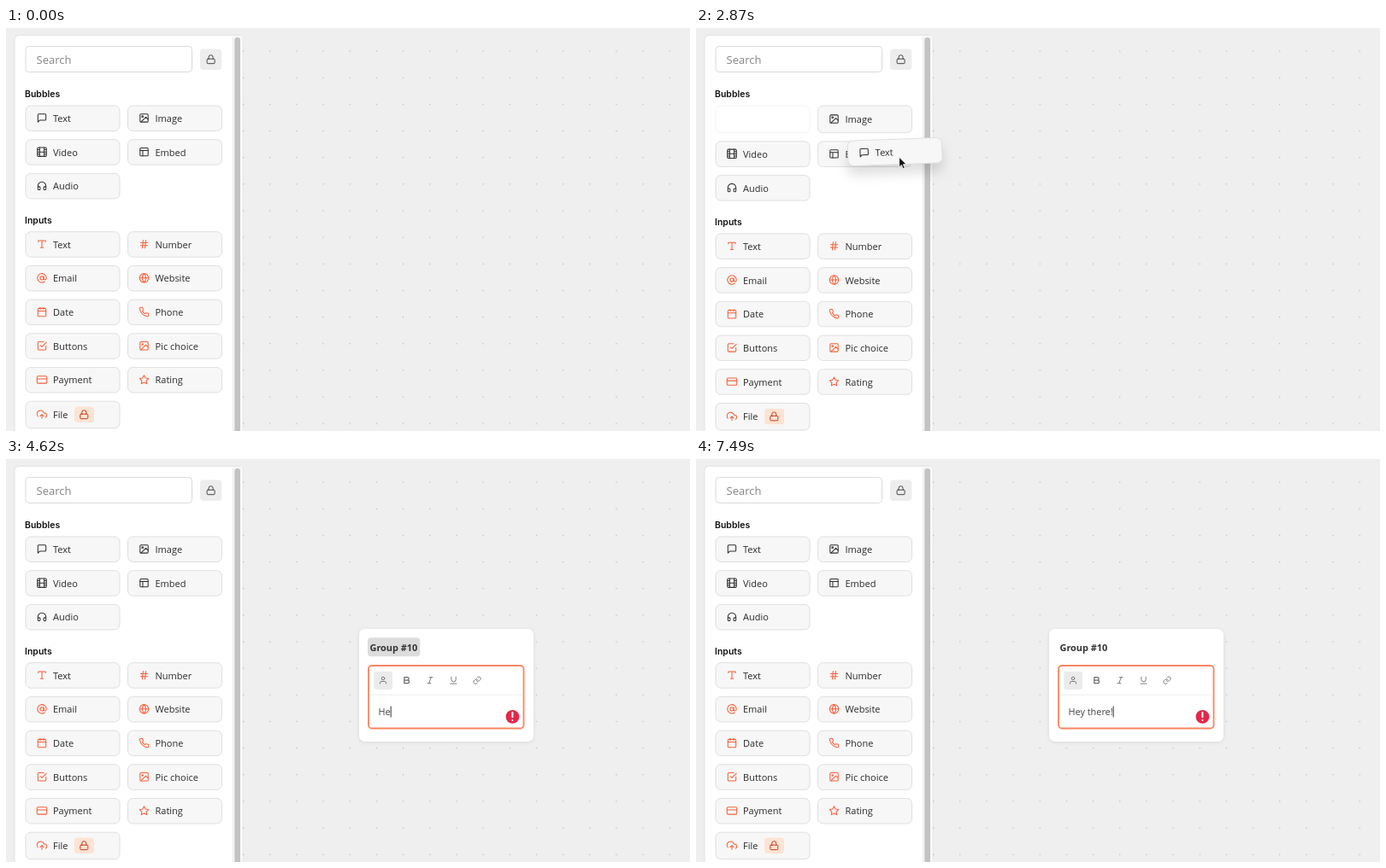
An HTML page that plays this animation: 800x472 px, repeating every 7.56 s.

```html
<!DOCTYPE html>
<html lang="en">
<head>
<meta charset="utf-8">
<title>Flow builder</title>
<style>
  html, body { margin: 0; width: 100%; height: 100%; overflow: hidden; background: #efefef; }
  svg { display: block; }
  text { font-family: "Open Sans", "Noto Sans", sans-serif; font-size: 11px; fill: #2b2b2b; dominant-baseline: alphabetic; }
  .heading { font: 600 10.5px Inter, sans-serif; fill: #111; }
  .icon { fill: none; stroke: currentColor; stroke-width: 2; stroke-linecap: round; stroke-linejoin: round; }
  .box { fill: #f7f7f7; stroke: #dfdfdf; }
  .hover { filter: drop-shadow(0 1.5px 1.5px rgba(0, 0, 0, .16)); }
</style>
</head>
<body>
<svg id="stage" width="800" height="472" viewBox="0 0 800 472"></svg>
<script>
const LOOP = 7560, STEP = 70;
const GRAB = 2660, DROP = 3360, TYPE_START = 4350, TYPE_STEP = 120, BLUR = 6790;
const MESSAGE = "Hey there!";

const frame = '<rect x="3" y="3" width="18" height="18" rx="2"/>';
const icons = {
  message: '<path d="M21 15a2 2 0 0 1-2 2H7l-4 4V5a2 2 0 0 1 2-2h14a2 2 0 0 1 2 2z"/>',
  image: frame + '<circle cx="8.5" cy="8.5" r="1.5"/><path d="M21 15l-5-5L5 21"/>',
  film: '<rect x="2" y="2" width="20" height="20" rx="2"/><path d="M7 2v20M17 2v20M2 12h20M2 7h5M2 17h5M17 17h5M17 7h5"/>',
  layout: frame + '<path d="M3 9h18M9 21V9"/>',
  headphones: '<path d="M3 18v-6a9 9 0 0 1 18 0v6M21 19a2 2 0 0 1-2 2h-1a2 2 0 0 1-2-2v-3a2 2 0 0 1 2-2h3zM3 19a2 2 0 0 0 2 2h1a2 2 0 0 0 2-2v-3a2 2 0 0 0-2-2H3z"/>',
  type: '<path d="M4 7V4h16v3M9 20h6M12 4v16"/>',
  hash: '<path d="M4 9h16M4 15h16M10 3L8 21M16 3l-2 18"/>',
  at: '<circle cx="12" cy="12" r="4"/><path d="M16 8v5a3 3 0 0 0 6 0v-1a10 10 0 1 0-3.92 7.94"/>',
  globe: '<circle cx="12" cy="12" r="10"/><path d="M2 12h20M12 2a15.3 15.3 0 0 1 4 10 15.3 15.3 0 0 1-4 10 15.3 15.3 0 0 1-4-10 15.3 15.3 0 0 1 4-10z"/>',
  calendar: '<rect x="3" y="4" width="18" height="18" rx="2"/><path d="M16 2v4M8 2v4M3 10h18"/>',
  phone: '<path d="M22 16.9v3a2 2 0 0 1-2.2 2 19.8 19.8 0 0 1-8.6-3.1 19.5 19.5 0 0 1-6-6A19.8 19.8 0 0 1 2.1 4.2 2 2 0 0 1 4.1 2h3a2 2 0 0 1 2 1.7q.3 1.5.7 2.8a2 2 0 0 1-.4 2.1L8.1 9.9a16 16 0 0 0 6 6l1.3-1.3a2 2 0 0 1 2.1-.4q1.3.4 2.8.7a2 2 0 0 1 1.7 2z"/>',
  check: '<path d="M9 11l3 3L22 4M21 12v7a2 2 0 0 1-2 2H5a2 2 0 0 1-2-2V5a2 2 0 0 1 2-2h11"/>',
  card: '<rect x="1" y="4" width="22" height="16" rx="2"/><path d="M1 10h22"/>',
  star: '<path d="M12 2l3.1 6.3 6.9 1-5 4.9 1.2 6.8-6.2-3.2L5.8 21 7 14.2 2 9.3l6.9-1z"/>',
  upload: '<path d="M16 16l-4-4-4 4M12 12v9M20.4 18.4A5 5 0 0 0 18 9h-1.3A8 8 0 1 0 3 16.3"/>',
  lock: '<rect x="3" y="11" width="18" height="11" rx="2"/><path d="M7 11V7a5 5 0 0 1 10 0v4"/>',
  user: '<path d="M20 21v-2a4 4 0 0 0-4-4H8a4 4 0 0 0-4 4v2"/><circle cx="12" cy="7" r="4"/>',
  bold: '<path stroke-width="3" d="M6 4h8a4 4 0 0 1 0 8H6zM6 12h9a4 4 0 0 1 0 8H6z"/>',
  italic: '<path d="M19 4h-9M14 20H5M15 4L9 20"/>',
  underline: '<path d="M6 3v7a6 6 0 0 0 12 0V3M4 21h16"/>',
  link: '<path d="M10 13a5 5 0 0 0 7.5.5l3-3a5 5 0 0 0-7-7l-1.8 1.7M14 11a5 5 0 0 0-7.5-.5l-3 3a5 5 0 0 0 7 7l1.7-1.7"/>'
};

const icon = (name, x, y, color, size = 12.5) =>
  `<g class="icon" color="${color}" transform="translate(${x} ${y}) scale(${size / 24}) translate(-12 -12)">${icons[name]}</g>`;
const rect = (x, y, w, h, r, attrs) =>
  `<rect x="${x}" y="${y}" width="${w}" height="${h}" rx="${r}" ${attrs}/>`;
const text = (x, y, label, attrs = "") => `<text x="${x}" y="${y}" ${attrs}>${label}</text>`;

// Each pair fills one row: label and icon for the left and the right column.
const bubbles = [["Text", "message"], ["Image", "image"], ["Video", "film"], ["Embed", "layout"], ["Audio", "headphones"]];
const inputs = [["Text", "type"], ["Number", "hash"], ["Email", "at"], ["Website", "globe"], ["Date", "calendar"],
  ["Phone", "phone"], ["Buttons", "check"], ["Pic choice", "image"], ["Payment", "card"], ["Rating", "star"], ["File", "upload"]];

const place = (list, top, color) => list.map(([label, name], i) => ({
  label, name, color,
  x: i % 2 ? 142.5 : 23,
  y: top + 39.7 * Math.floor(i / 2),
  h: label === "File" ? 31.5 : 29.5
}));
const items = [...place(bubbles, 91, "#2f2f2f"), ...place(inputs, 238.7, "#f2603a")];

const content = item => {
  const mid = item.h / 2;
  return rect(0, 0, 110, item.h, 6, 'class="box"') + icon(item.name, 19, mid - .3, item.color) +
    text(32, mid + 4.2, item.label) +
    (item.label === "File" ? rect(57, mid - 9.5, 23, 18.5, 4, 'fill="#fde3d3"') + icon("lock", 68.3, mid - .3, "#c63a1e", 12) : "");
};

const stage = document.getElementById("stage");
stage.innerHTML = `
  <defs>
    <pattern id="dots" x="277" y="26.5" width="31.16" height="31.15" patternUnits="userSpaceOnUse">
      <rect width="1.2" height="1.2" fill="#b4b4b4"/>
    </pattern>
  </defs>
  <rect width="800" height="472" fill="#efefef"/>
  <rect x="276.5" width="503" height="472" fill="url(#dots)"/>
  <g style="filter:drop-shadow(0 0 1px rgba(0,0,0,.12))">${rect(10.5, 9, 266, 480, 5, 'fill="#fff"')}</g>
  ${rect(265, 9, 11.5, 480, 2, 'fill="#f8f8f8"')}
  <path d="M265.3 10v462" stroke="#ebebeb"/>
  ${rect(267.3, 11, 6.7, 480, 3.3, 'fill="#c3c3c3"')}
  ${rect(23, 21.5, 194.5, 30, 4, 'fill="#fff" stroke="#dadada"')}
  ${text(35.5, 41.7, "Search", 'style="font-size:13px;fill:#858585"')}
  ${rect(227, 24.5, 25.3, 24.5, 4, 'fill="#ededed"')}
  ${icon("lock", 239.6, 36.7, "#444", 12)}
  ${text(22, 81, "Bubbles", 'class="heading"')}
  <g id="inputsHeading">${text(22, 229, "Inputs", 'class="heading"')}</g>
  ${items.map(item => `<g class="item">${content(item)}</g>`).join("")}
  <g id="group">
    <g style="filter:drop-shadow(0 1px 2px rgba(0,0,0,.09))">${rect(413, 199, 204, 132, 7, 'fill="#fff"')}</g>
    ${rect(423, 209.3, 61.3, 22, 4, 'id="selection" fill="#dcdcdc"')}
    ${text(425.5, 224.7, "Group #10", 'style="font-weight:700;font-size:10.9px;fill:#333"')}
    ${rect(424, 242, 181.5, 73.5, 4, 'fill="#fff" stroke="#f98560" stroke-width="1.8"')}
    <path d="M425 276.2h179.5" stroke="#ececec"/>
    ${rect(430.3, 248.7, 21.7, 21.3, 3, 'fill="#ebebeb"')}
    ${["user", "bold", "italic", "underline", "link"].map((name, i) => icon(name, 441 + 27.5 * i, 259.2, "#6c6c6c", 10.5)).join("")}
    ${text(435.5, 300, "", 'id="message" style="font-weight:500;font-size:10.9px;fill:#444"')}
    <rect id="caret" y="289.5" width="1" height="13" fill="#333"/>
    <circle cx="592.4" cy="301.8" r="7.9" fill="#e5264b"/>
    <path d="M592.4 297v5.3M592.4 306v.1" stroke="#fff" stroke-width="2" stroke-linecap="round"/>
  </g>
  <g id="chip" style="filter:drop-shadow(0 10px 7px rgba(0,0,0,.13))">
    <g transform="rotate(-2) translate(-55 -14.75)">${content(items[0])}</g>
  </g>
  <g id="arrow"><path d="M0 0v11.6l2.7-2.5 1.8 4.2 2-.9-1.8-4.1h3.7z" fill="#111" stroke="#fff" stroke-width=".8"/></g>
  <g id="hand" fill="#fff" stroke="#111" stroke-linejoin="round" stroke-linecap="round">
    <path d="M-3 6.5C-3.5 4-7 1.5-6.3.2-5.5-1-4 .2-3.3 1.3L-4.6-3.6C-5-5.3-3.2-5.8-2.7-4.2L-1.8-1.2-2-5.3C-2-7 0-7 .1-5.4L.5-1.5 1.1-5.1C1.4-6.7 3.2-6.3 3-4.7L2.7-1 4-3.5C4.7-4.8 6.2-4.1 5.8-2.7L4.7 2 3.4 4.5V6.5Z"/>
    <path d="M-.6 2v2.4M1.5 2v2.4" stroke-width=".7"/>
  </g>`;

const byId = id => document.getElementById(id);
const itemNodes = [...stage.querySelectorAll(".item")];
const [group, selection, message, caret, chip, arrow, hand, inputsHeading] =
  ["group", "selection", "message", "caret", "chip", "arrow", "hand", "inputsHeading"].map(byId);
const show = (node, visible) => { node.style.display = visible ? "" : "none"; };
const move = (node, x, y) => node.setAttribute("transform", `translate(${x} ${y})`);

// Pointer stops: time, x, y.
const stops = [[1820, 285, 480], [2100, 146, 212], [2450, 95, 128], [2590, 83, 112],
  [GRAB, 83, 112], [3150, 476, 212], [3290, 474.5, 220]];

function pointerAt(t) {
  const next = stops.findIndex(stop => stop[0] > t);
  if (next < 0) return stops[stops.length - 1].slice(1);
  if (next === 0) return stops[0].slice(1);
  const [from, to] = [stops[next - 1], stops[next]];
  const p = (t - from[0]) / (to[0] - from[0]), eased = p * p * (3 - 2 * p);
  return [1, 2].map(k => from[k] + (to[k] - from[k]) * eased);
}

function draw(t) {
  const [x, y] = pointerAt(t);
  const dragging = t >= GRAB && t < DROP;
  const grabbing = t >= 2240 && t <= GRAB;
  const pointing = t >= 1820 && t < TYPE_START;

  itemNodes.forEach((node, i) => {
    const item = items[i], pad = 4;
    const firstRow = i < 2;
    const hovered = grabbing && x > item.x && x < item.x + 110 && y > item.y - pad && y < item.y + item.h + pad;
    move(node, item.x, item.y + (dragging ? (firstRow ? 0 : 2.2) : 0));
    node.classList.toggle("hover", hovered);
    if (firstRow) node.firstChild.setAttribute("height", item.h + (dragging ? 2.2 : 0));
    [...node.children].slice(1).forEach(child => {
      if (i === 0) show(child, !dragging);
      if (i === 1) child.style.translate = dragging ? "0 1.1px" : "";
    });
  });
  itemNodes[0].firstChild.style.cssText = dragging ? "fill:#fff;stroke:#f4f4f4" : "";
  move(inputsHeading, 0, dragging ? 2.2 : 0);

  show(chip, dragging);
  move(chip, x - 5, y - 6.3);
  show(arrow, pointing && !grabbing);
  move(arrow, x, y);
  show(hand, pointing && grabbing);
  move(hand, x, y);

  show(group, t >= DROP);
  show(selection, t < BLUR);
  if (t >= DROP) {
    const count = Math.max(0, Math.min(MESSAGE.length, Math.floor((t - TYPE_START) / TYPE_STEP)));
    message.textContent = MESSAGE.slice(0, count);
    caret.setAttribute("x", 435.5 + message.getComputedTextLength());
  }
}

const start = performance.now();
function tick() {
  const t = (performance.now() - start) % LOOP;
  draw(Math.floor(t / STEP) * STEP);
  requestAnimationFrame(tick);
}
tick();
</script>
</body>
</html>
```
